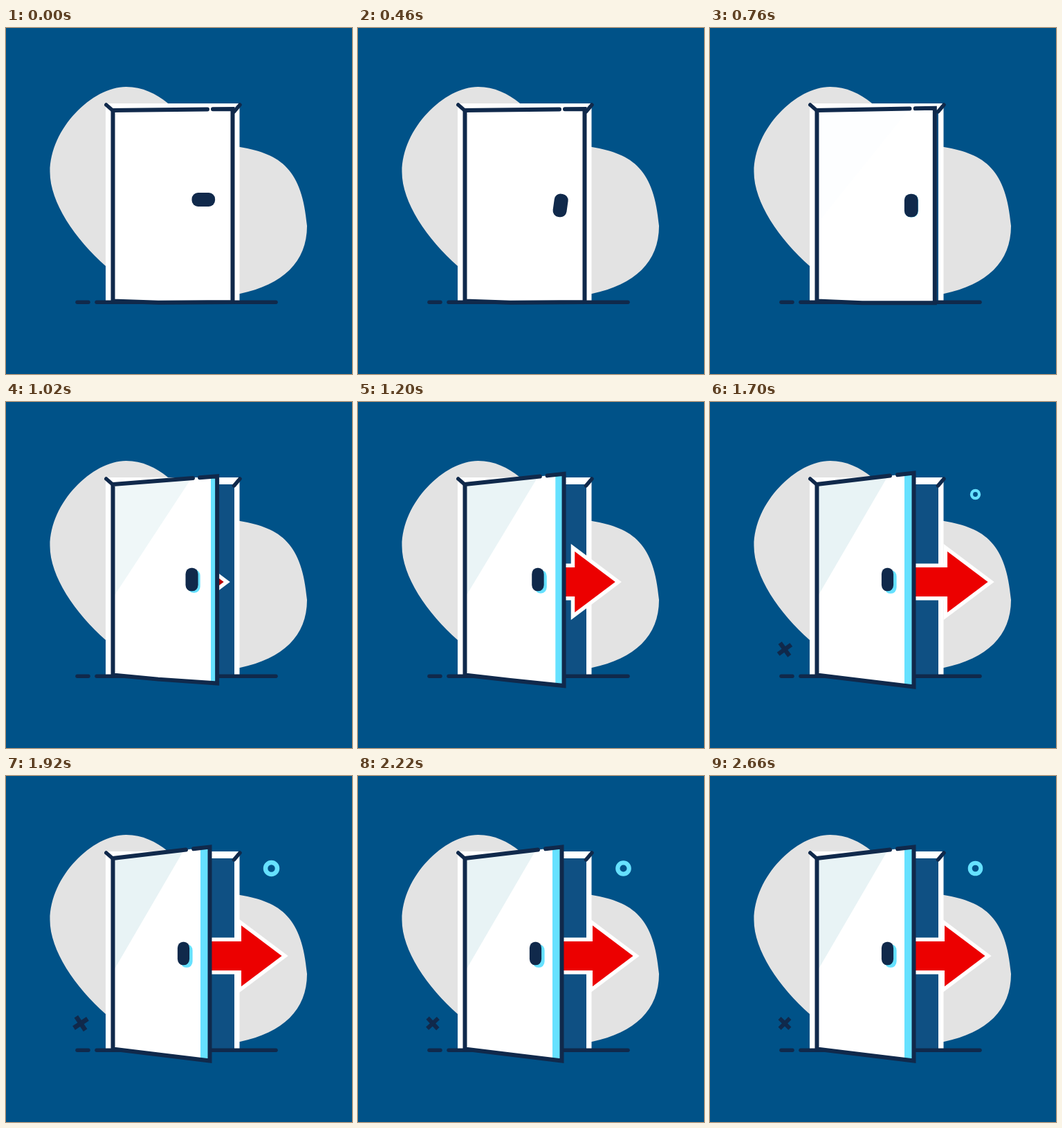
Write an HTML page with a canvas that moves like this. It is 500 by 500 pixels and loops after 3040 ms.

```html
<!DOCTYPE html>
<html lang="en">
<head>
<meta charset="utf-8">
<title>Opening door</title>
<style>
  html, body { margin: 0; width: 100%; height: 100%; overflow: hidden; background: #005288; }
  canvas { display: block; }
</style>
</head>
<body>
<canvas id="stage" width="500" height="500"></canvas>
<script>
const ctx = document.getElementById('stage').getContext('2d');
const LOOP = 3040;
const NAVY = '#10294b', CYAN = '#66e1ff', WHITE = '#fff';

const blob = new Path2D(`M173.5 85 C197 85 217 95 233 108 C270 142 300 165 338 172
  C398 182 428 205 435 286 C435 338 400 371 338 384
  C290 392 200 388 144 344 C100 305 63.5 252 63.5 208 C63.5 145 125 85 173.5 85Z`);
const arrow = new Path2D('M180 239 H339 V216 L397.5 260 L339 304 V281 H180Z');

const lerp = (a, b, k) => a + (b - a) * k;

// Cubic bezier easing (.33, 0, .3, 1)
function ease(t, start, length) {
  const x = Math.min(1, Math.max(0, (t - start) / length));
  let lo = 0, hi = 1;
  for (let i = 0; i < 20; i++) {
    const s = (lo + hi) / 2, r = 1 - s;
    if (0.99 * r * r * s + 0.9 * r * s * s + s * s * s < x) lo = s; else hi = s;
  }
  return lo * lo * (3 - 2 * lo);
}

// Move to a peak, then settle on the resting value
function overshoot(t, start, rise, settle, from, peak, rest) {
  return t < start + rise
    ? lerp(from, peak, ease(t, start, rise))
    : lerp(peak, rest, ease(t, start + rise, settle));
}

function trace(points) {
  ctx.beginPath();
  for (const [x, y] of points) ctx.lineTo(x, y);
}

function line(points, width = 6, color = NAVY, cap = 'round') {
  trace(points);
  ctx.lineWidth = width;
  ctx.strokeStyle = color;
  ctx.lineCap = cap;
  ctx.stroke();
}

function fill(points, color) {
  trace(points);
  ctx.fillStyle = color;
  ctx.fill();
}

function placed(x, y, draw) {
  ctx.save();
  ctx.translate(x, y);
  draw();
  ctx.restore();
}

function drawScene() {
  ctx.fillStyle = '#005288';
  ctx.fillRect(0, 0, 500, 500);
  ctx.fillStyle = '#e3e3e3';
  ctx.fill(blob);
  ctx.fillStyle = WHITE;
  ctx.fillRect(144, 109, 193.5, 285);
  ctx.fillStyle = '#0f5083';
  ctx.fillRect(152, 119, 178, 275);
  line([[103, 396.2], [119, 396.2]], 5.5);
  line([[131, 396.2], [390, 396.2]], 5.5);
}

function drawArrow(t) {
  placed(0, 0, () => {
    // The arrow only shows to the right of the hinge
    ctx.beginPath();
    ctx.rect(160, 0, 340, 500);
    ctx.clip();
    ctx.translate(overshoot(t, 740, 820, 660, -158, 5, 0), 0);
    ctx.lineWidth = 11;
    ctx.strokeStyle = WHITE;
    ctx.stroke(arrow);
    ctx.fillStyle = `rgb(${lerp(180, 236, ease(t, 1000, 160))}, 0, 0)`;
    ctx.fill(arrow);
  });
}

function drawHandle(x, y, open, turn, color) {
  placed(x, y, () => {
    ctx.scale(1 - 0.14 * open, 1);
    ctx.rotate(-turn * Math.PI / 2);
    ctx.beginPath();
    ctx.roundRect(-25.3, -10, 33.6, 20, 9);
    ctx.fillStyle = color;
    ctx.fill();
  });
}

function drawDoor(t) {
  const open = ease(t, 640, 830), turn = ease(t, 120, 500);
  const left = 154.5, top = 119, bottom = 394.5;
  const edge = lerp(327.5, 294.5, open);
  const edgeTop = lerp(117, 102.5, open), edgeBottom = lerp(396, 411.5, open);
  const fold = [220, lerp(396.7, 402.5, open)];
  const onTop = x => [x, lerp(top, edgeTop, (x - left) / (edge - left))];
  const corner = [edge, edgeTop], foot = [edge, edgeBottom];

  fill([[left, top], corner, foot, fold, [left, bottom]], WHITE);
  ctx.globalAlpha = open;
  fill([[left, top], onTop(lerp(291, 257, open)), [left, 283]], '#e8f3f5');
  ctx.globalAlpha = 1;
  const strip = edge - 13.5 * open;
  fill([onTop(strip), corner, foot, [strip, edgeBottom - 1.6 * open]], CYAN);

  line([onTop(lerp(299, 271, open)), corner, foot, fold,
    [left, bottom], [left, top], onTop(lerp(291, 260, open))]);

  const hx = 293.8 - 37.3 * open;
  if (open) drawHandle(hx + 4.5 * open, 248 + 3.5 * open, open, turn, CYAN);
  drawHandle(hx, 248, open, turn, NAVY);
}

function drawAccents(t) {
  const size = overshoot(t, 1240, 600, 660, 0, 1.15, 1);
  if (size > 0) placed(108, 357.5, () => {
    ctx.rotate(overshoot(t, 1240, 600, 660, -60, 12, 0) * Math.PI / 180);
    ctx.scale(size, size);
    line([[-7.4, -7.4], [7.4, 7.4]], 5.8, NAVY, 'butt');
    line([[-7.4, 7.4], [7.4, -7.4]], 5.8, NAVY, 'butt');
  });

  const ring = overshoot(t, 1480, 500, 660, 0, 1.1, 1);
  if (ring > 0) placed(383.5, 133.5, () => {
    ctx.scale(ring, ring);
    ctx.beginPath();
    ctx.arc(0, 0, 7.8, 0, Math.PI * 2);
    ctx.lineWidth = 6;
    ctx.strokeStyle = CYAN;
    ctx.stroke();
  });
}

function frame(now) {
  const t = now % LOOP;
  drawScene();
  drawArrow(t);
  line([[144.8, 111], [154, 119]], 5.5);
  line([[338, 111], [329.5, 121]], 5.5);
  drawDoor(t);
  drawAccents(t);
  requestAnimationFrame(frame);
}
requestAnimationFrame(frame);
</script>
</body>
</html>
```
